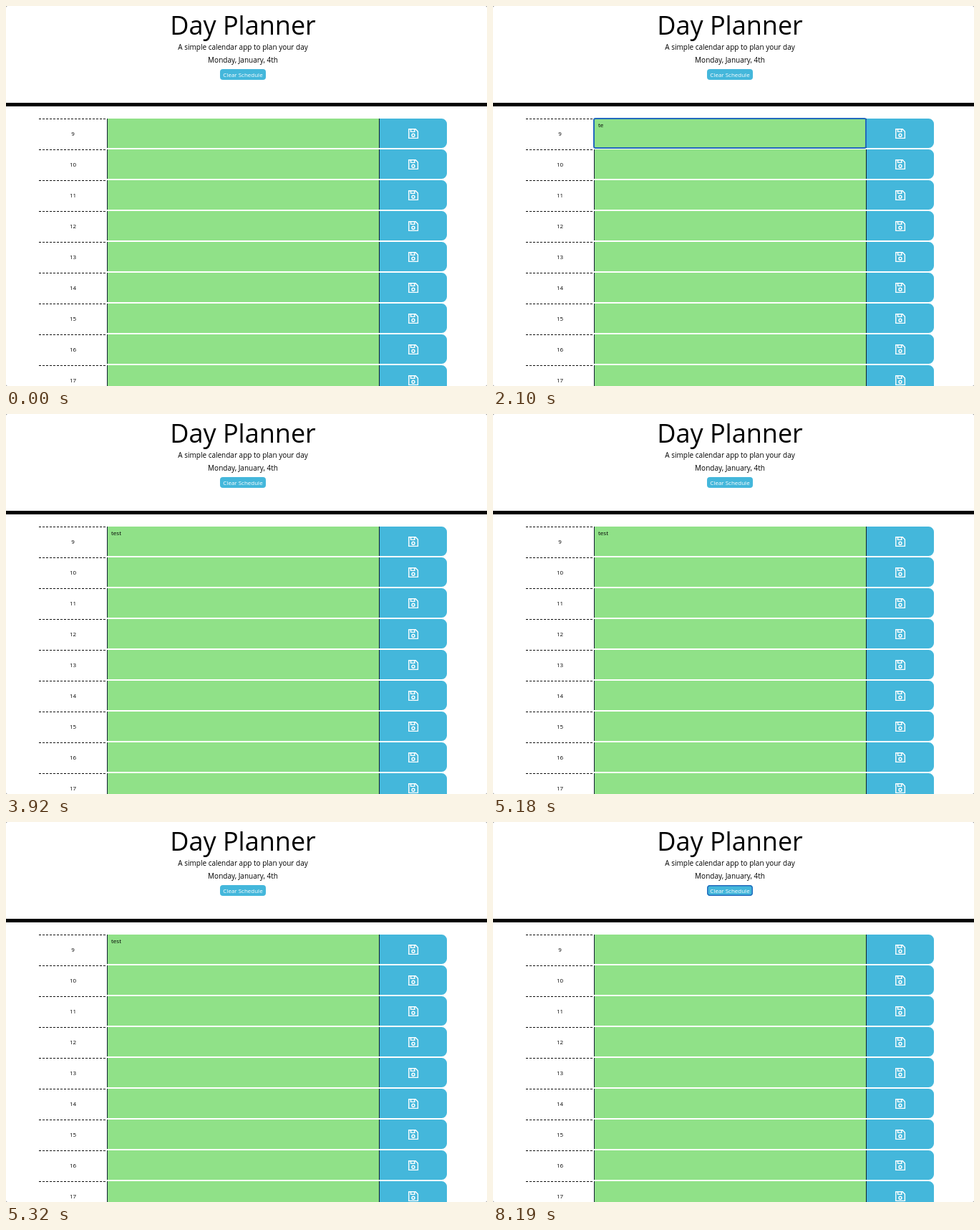
An HTML page that plays this animation: 672 by 530 pixels, repeating every 8260 ms.

```html
<!DOCTYPE html>
<html lang="en">
<head>
<meta charset="utf-8">
<title>Day Planner</title>
<style>
  html, body { margin: 0; width: 100%; height: 100%; overflow: hidden; background: #8a8a8a; }
  svg { display: block; width: 672px; height: 530px; }
  text { font-family: "Open Sans", "Noto Sans", sans-serif; font-size: 8px; fill: #000; }
  .mid { text-anchor: middle; }
  .h1 { font-size: 36px; }
  .lead { font-size: 10px; }
  .white { fill: #fff; }
  .blue { fill: #44b7db; }
  .green { fill: #90e188; }
  .icon { fill: none; stroke: #fff; stroke-width: 1.4; }
  .ring { fill: none; stroke: #2369bd; stroke-width: 2; }
  #plain text { font-family: "Liberation Sans", Arial, sans-serif; }
  #plain .h1 { stroke: #fff; stroke-width: .9px; }
  #plain .lead { font-size: 10.2px; stroke: #fff; stroke-width: .12px; }
</style>
</head>
<body>
<svg viewBox="0 0 672 530">
  <defs>
    <g id="save" class="icon">
      <path d="M562.8 171.8h9.4l3.2 3.2v9.4h-12.6z"/>
      <path d="M565.6 172v3.4h5.2v-3.4"/>
      <circle cx="569" cy="180.2" r="2"/>
    </g>
  </defs>
  <rect width="672" height="530" rx="2.5" fill="#fff"/>

  <g id="planner">
    <text class="mid h1" x="331" y="40">Day Planner</text>
    <text class="mid lead" x="331" y="61">A simple calendar app to plan your day</text>
    <text class="mid lead" x="331" y="79">Monday, January, 4th</text>
    <rect class="blue" x="299" y="88" width="64" height="15" rx="4"/>
    <text class="mid white" x="331" y="99">Clear Schedule</text>
    <rect id="btnRing" class="ring" x="299.75" y="88.75" width="62.5" height="13.5" rx="3.5" style="stroke-width:1.5px"/>
    <rect y="135" width="672" height="5"/>
    <g id="rows"></g>
    <text id="note" x="147" y="169"></text>
    <rect id="rowRing" class="ring" x="141" y="157" width="380" height="41" rx="2"/>
  </g>

  <g id="plain">
    <text class="mid h1" x="331" y="40">Day Planner</text>
    <text class="mid lead" x="331" y="61">A simple calendar app to plan your day</text>
    <rect class="blue" x="300" y="70" width="62" height="15" rx="4"/>
    <text class="mid white" x="331" y="80">Clear Schedule</text>
    <rect y="117" width="672" height="5"/>
  </g>
</svg>
<script>
  const LOOP = 8260;
  const FOCUS = 1050, BLUR = 3220, RELOAD = 5250, LOADED = 5320, CLEAR = 6860;
  const KEYS = [1960, 2100, 2240, 2380];
  const $ = id => document.getElementById(id);

  const row = (hour, i) => `
    <g transform="translate(0 ${i * 43})">
      <path d="M46 157.5H141" stroke="#000" stroke-dasharray="3 2"/>
      <text class="mid" x="93.6" y="181">${hour}</text>
      <rect class="green" x="141" y="157" width="381" height="41"/>
      <path d="M141.5 157v41M521.5 157v41" stroke="#123"/>
      <path class="blue" d="M522 157h86.5a7.5 7.5 0 0 1 7.5 7.5v26a7.5 7.5 0 0 1-7.5 7.5H522z"/>
      <use href="#save"/>
    </g>`;
  $("rows").innerHTML = Array.from({ length: 9 }, (_, i) => row(9 + i, i)).join("");

  const show = (id, on) => { $(id).style.display = on ? "" : "none"; };

  function draw(t) {
    const bare = t >= RELOAD && t < LOADED;
    show("plain", bare);
    show("planner", !bare);
    show("rowRing", t >= FOCUS && t < BLUR);
    show("btnRing", t >= CLEAR);
    const typed = t < CLEAR ? KEYS.filter(k => t >= k).length : 0;
    $("note").textContent = "test".slice(0, typed);
  }

  const start = performance.now();
  function tick() {
    draw((performance.now() - start) % LOOP);
    requestAnimationFrame(tick);
  }
  tick();
</script>
</body>
</html>
```
